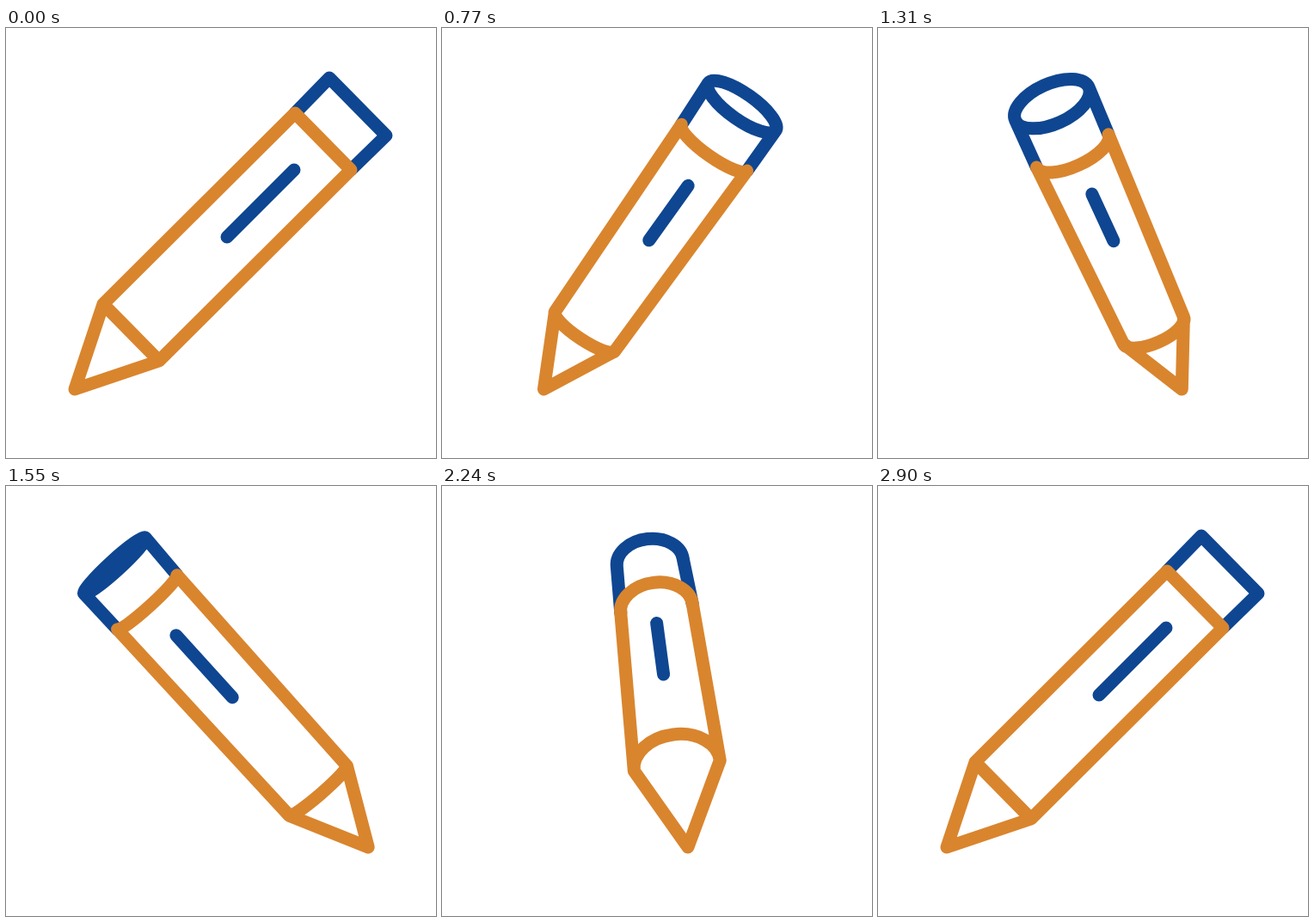
These frames come from a looping animation (500 by 500 pixels, 2930 ms). An HTML page with a canvas:

```html
<!DOCTYPE html>
<html>
<head>
<meta charset="utf-8">
<style>
  html, body { margin: 0; height: 100%; overflow: hidden; background: #fff; }
  canvas { display: block; width: 500px; height: 500px; }
</style>
</head>
<body>
<canvas id="stage" width="500" height="500"></canvas>
<script>
const ctx = document.getElementById('stage').getContext('2d');
const ORANGE = '#d9852e', BLUE = '#0f4691';
const LOOP = 2930, HOLD = 500, STEP = 30, STEPS = 80, MID = 256.5;

// Each part is a centre and a half-span, as polynomials in the sine of the turn.
// Centre x and the cross component of the span also scale with its cosine.
const PARTS = {
  shoulder: { x: [-111, -8.8, -5.1], y: [354, 6, -16.5, 7], hx: [32.5, 0, 10.2, -7.8], hy: [33, -5, 1.3] },
  collar: { x: [112, -1, -82, 0, 12], y: [132, 4, 12.5, -2.5], hx: [32.5, 1.5, 11], hy: [33, 2, 2.5] },
  eraser: { x: [152.5, -1, -80, 0, 19], y: [91.5, 4, 1, -7, -6], hx: [33, 3.5, 9.2], hy: [33.5, 5, -1] }
};
const TIP = [-176.5, 0, -12];
const MARK = { x: [39.5, -4, -64.3, -17, 22.5], y: [204, 13, 3, 5], hx: [39, -3, -17], hy: [39, -3, -12.5] };
const BULGE = [0, 0.27, -0.1, 0.376];
const RIM = [0, 0, 1, -0.37];

const poly = (k, s) => k.reduceRight((sum, a) => sum * s + a, 0);

function ring(part, s, c) {
  const x = MID + c * poly(part.x, s), y = poly(part.y, s);
  const hx = poly(part.hx, s), hy = c * poly(part.hy, s);
  return { x, y, r: Math.hypot(hx, hy), tilt: Math.atan2(hy, hx),
           left: [x - hx, y - hy], right: [x + hx, y + hy] };
}

// Half of a rim, left to right; a positive bulge hangs down.
function arc(o, bulge) {
  ctx.ellipse(o.x, o.y, o.r, o.r * Math.abs(bulge), o.tilt, Math.PI, 0, bulge > 0);
}

function stroke(color, build) {
  ctx.strokeStyle = color;
  ctx.beginPath();
  build();
  ctx.stroke();
}

function draw(turn) {
  const s = Math.sin(turn), c = Math.cos(turn);
  const shoulder = ring(PARTS.shoulder, s, c);
  const collar = ring(PARTS.collar, s, c);
  const eraser = ring(PARTS.eraser, s, c);
  const bulge = poly(BULGE, s);
  const open = s > 0;

  ctx.clearRect(0, 0, 500, 500);
  ctx.lineWidth = 15;
  ctx.lineCap = ctx.lineJoin = 'round';

  stroke(BLUE, () => {
    const rim = open ? poly(RIM, s) : -bulge;
    ctx.moveTo(...collar.left);
    ctx.lineTo(...eraser.left);
    arc(eraser, -rim);
    ctx.lineTo(...collar.right);
    if (open) {
      ctx.moveTo(...eraser.left);
      arc(eraser, rim);
    }
  });

  stroke(BLUE, () => {
    const x = MID + c * poly(MARK.x, s), y = poly(MARK.y, s);
    const dx = c * poly(MARK.hx, s), dy = poly(MARK.hy, s);
    ctx.moveTo(x + dx, y - dy);
    ctx.lineTo(x - dx, y + dy);
  });

  stroke(ORANGE, () => {
    ctx.moveTo(MID + c * poly(TIP, s), 420);
    ctx.lineTo(...shoulder.left);
    ctx.lineTo(...collar.left);
    arc(collar, bulge);
    ctx.lineTo(...shoulder.right);
    ctx.closePath();
    ctx.moveTo(...shoulder.left);
    arc(shoulder, bulge);
  });
}

const start = performance.now();
function tick() {
  const t = (performance.now() - start) % LOOP;
  const n = Math.max(0, Math.floor((t - HOLD) / STEP));
  draw((n % STEPS) / STEPS * 2 * Math.PI);
  requestAnimationFrame(tick);
}
tick();
</script>
</body>
</html>
```
